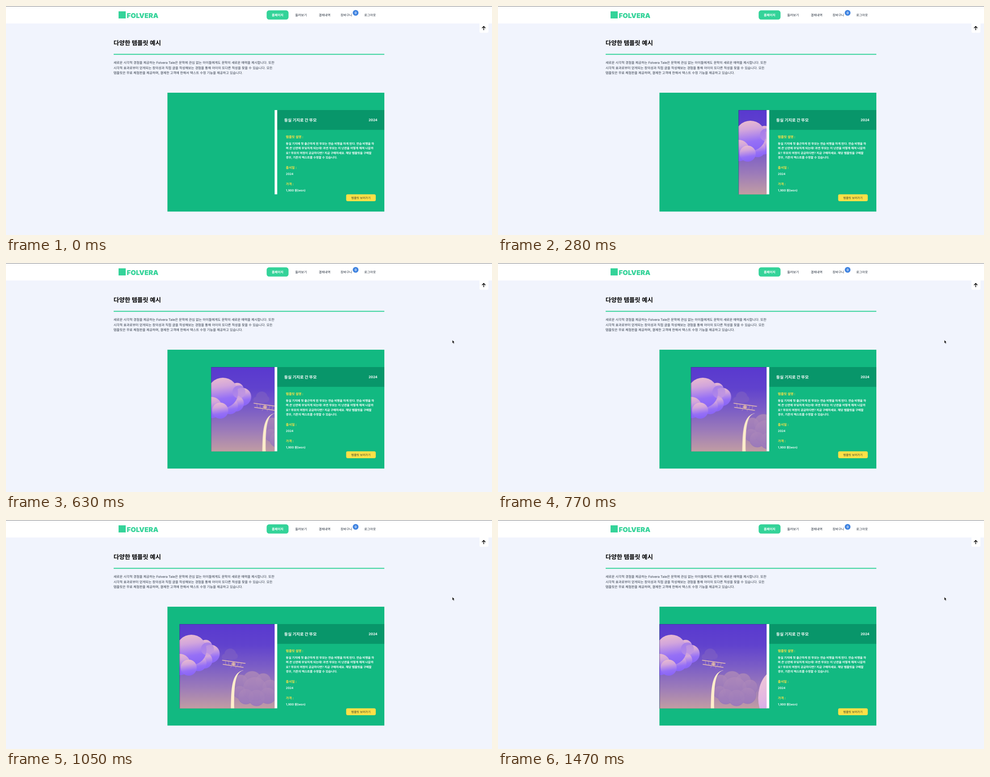
These frames come from a looping animation (1088 by 515 pixels, 2.17 s). An HTML page:

```html
<!DOCTYPE html>
<html lang="ko">
<head>
<meta charset="utf-8">
<title>템플릿 예시</title>
<style>
  html, body { margin: 0; width: 100%; height: 100%; overflow: hidden; background: #f1f4fd; }
  svg { display: block; width: 1088px; height: 515px; }
  text {
    font-family: Inter, "Noto Sans CJK KR", "Noto Sans CJK", "Noto Sans", sans-serif;
    text-rendering: geometricPrecision;
  }
  .nav { font-size: 7.05px; font-weight: 500; fill: #1f2937; text-anchor: middle; }
  .lead { font-size: 7.32px; fill: #2b3441; }
  .label { font-size: 7.2px; font-weight: 700; fill: #fde047; }
  .info { font-size: 6.58px; font-weight: 600; fill: #fff; }
</style>
</head>
<body>
<svg viewBox="0 0 1088 515">
  <defs>
    <linearGradient id="sky" x2="0" y2="1">
      <stop offset="0" stop-color="#5939cf"/>
      <stop offset=".25" stop-color="#6042cd"/>
      <stop offset=".5" stop-color="#7b5dc6"/>
      <stop offset=".75" stop-color="#9c7bb9"/>
      <stop offset="1" stop-color="#c29da3"/>
    </linearGradient>
    <linearGradient id="puff" x2=".15" y2="1">
      <stop offset="0" stop-color="#eebfcd"/>
      <stop offset=".35" stop-color="#d2a5dc"/>
      <stop offset=".75" stop-color="#9670f6"/>
      <stop offset="1" stop-color="#8b66f6"/>
    </linearGradient>
    <linearGradient id="fold" x2=".2" y2="1">
      <stop offset="0" stop-color="#8a66ef"/>
      <stop offset="1" stop-color="#c79be0"/>
    </linearGradient>
    <linearGradient id="haze" x2="0" y2="1">
      <stop offset="0" stop-color="#b38dba"/>
      <stop offset="1" stop-color="#9c7bbb"/>
    </linearGradient>
    <linearGradient id="rose" x2=".3" y2="1">
      <stop offset="0" stop-color="#f3cbd2"/>
      <stop offset=".5" stop-color="#e3b7e2"/>
      <stop offset="1" stop-color="#c79cf3"/>
    </linearGradient>
    <clipPath id="window"><rect x="361.5" y="234" width="240" height="190"/></clipPath>
  </defs>

  <!-- header -->
  <rect width="1088" height="515" fill="#f1f4fd"/>
  <rect width="1088" height="39.3" fill="#fff"/>
  <rect width="1088" height="1" fill="#77797d"/>
  <rect x="252" y="12" width="16" height="16" fill="#34d399"/>
  <text x="270.5" y="27.3" font-size="15" font-weight="900" fill="#34d399">FOLVERA</text>
  <rect x="583.5" y="9.8" width="49" height="20.8" rx="5.5" fill="#34d399"/>
  <g class="nav">
    <text x="608" y="22.7" style="fill:#fff;font-weight:700">홈페이지</text>
    <text x="660.5" y="22.7">둘러보기</text>
    <text x="713.2" y="22.7">결제내역</text>
    <text x="762" y="22.7">장바구니</text>
    <text x="815" y="22.7">로그아웃</text>
  </g>
  <circle cx="782.7" cy="15.4" r="6.4" fill="#3f83e0"/>
  <text x="782.7" y="18" font-size="7" font-weight="600" fill="#fff" text-anchor="middle">0</text>
  <path d="M1060 39.3h20v18a3 3 0 0 1-3 3h-14a3 3 0 0 1-3-3z" fill="#fff"/>
  <path d="M1069.5 54.3v-8.4m-3.8 3.9 3.8-4 3.8 4" fill="none" stroke="#000" stroke-width="1.5"/>

  <!-- intro -->
  <text x="240.8" y="88.4" font-size="13.55" font-weight="700">다양한 템플릿 예시</text>
  <rect x="241" y="107.6" width="606" height="2.1" fill="#34d399"/>
  <g class="lead">
    <text x="240.8" y="129.9">새로운 시각적 경험을 제공하는 Folvera Tale은 문학에 관심 없는 아이들에게도 문학의 새로운 매력을 제시합니다. 또한</text>
    <text x="240.8" y="141.5">시각적 효과로부터 얻게되는 창의성과 직접 글을 작성해보는 경험을 통해 아이의 또다른 적성을 찾을 수 있습니다. 모든</text>
    <text x="240.8" y="153">템플릿은 무료 체험판을 제공하며, 결제한 고객에 한해서 텍스트 수정 기능을 제공하고 있습니다.</text>
  </g>

  <!-- card -->
  <rect x="361.4" y="195" width="485.6" height="267.3" fill="#12b981"/>
  <rect x="607" y="234" width="240" height="44.5" fill="#08966a"/>
  <text x="622.7" y="259.7" font-size="9.02" font-weight="700" fill="#fff">둥실 기지로 간 뚜모</text>
  <text x="831.5" y="259.2" font-size="7.6" font-weight="700" fill="#fff" text-anchor="end">2024</text>
  <g class="label">
    <text x="626.6" y="297.2">템플릿 설명 :</text>
    <text x="626.6" y="366.1">출시일 :</text>
    <text x="626.6" y="403">가격 :</text>
  </g>
  <g class="info">
    <text x="626.6" y="311.7">둥실 기지에 첫 출근하게 된 뚜모는 연습 비행을 하게 된다. 연습 비행을 하</text>
    <text x="626.6" y="322.1">며 큰 난관에 부딪히게 되는데! 과연 뚜모는 이 난관을 어떻게 해쳐 나갈까</text>
    <text x="626.6" y="332.5">요? 뚜모의 여정이 궁금하다면? 지금 구매하세요. 해당 템플릿을 구매할</text>
    <text x="626.6" y="342.9">경우, 기존의 텍스트를 수정할 수 있습니다.</text>
    <text x="626.6" y="380.3">2024</text>
    <text x="626.6" y="417.3">1,900 원(won)</text>
  </g>
  <rect x="761.5" y="423.4" width="66.3" height="15.7" rx="3.5" fill="#fde047"/>
  <text x="794.6" y="433.7" font-size="6.45" font-weight="500" fill="#33402c" text-anchor="middle">템플릿 보러가기</text>

  <!-- the picture slides out from behind the white bar -->
  <g clip-path="url(#window)">
    <g id="slide">
      <g clip-path="url(#window)">
        <rect x="361.5" y="234" width="240" height="190" fill="url(#sky)"/>
        <g id="far" fill="#8263c2" opacity=".55"></g>
        <g id="near"></g>
        <g id="low"></g>
        <path d="M476.5 424C477.5 385 476 341 507 337.6C491 341 483 352 484 424Z" fill="#ffedcb"/>
        <ellipse cx="622" cy="400" rx="39.5" ry="62" fill="url(#rose)"/>
        <g fill="none" stroke="#dfb8b1" stroke-linecap="round">
          <path d="M457.5 315.3 508.5 322.4M459 324.6 504 331.3" stroke-width="1.7"/>
          <path d="M464 316.5l1 8.5m6-7.5 1 8.5m21-5.5-2 8.5m9-7.5-2 8.5M478 328l-2 4m11-2 1 3" stroke-width=".6"/>
        </g>
        <circle cx="482.3" cy="324" r="4.6" fill="#cfa6ae"/>
        <path d="M478 320l8.5 8.5m-.5-9-7.5 9" stroke="#8e6b9f" stroke-width=".8"/>
        <circle cx="482.3" cy="324.3" r="1.8" fill="#e7c6b6"/>
        <path d="M361.8 424V234.3H601.5" fill="none" stroke="#2c2a78" stroke-width=".8" opacity=".75"/>
        <path d="M361.5 423.8H601.5" stroke="#7d8a79" stroke-width=".6"/>
      </g>
    </g>
  </g>
  <rect x="601.4" y="234" width="5.8" height="189.5" fill="#fff"/>

  <path id="pointer" d="M999.3 173.3v7.2l1.6-1.5 1.2 2.7 1.2-.5-1.2-2.7h2.1z" fill="#000" stroke="#fff" stroke-width=".4"/>
</svg>
<script>
const LOOP = 2170, STEP = 70;
const $ = id => document.getElementById(id);

// Puffs are [x, y, radius].
function puffs(id, list, attrs = {}) {
  for (const [cx, cy, r] of list) {
    const c = document.createElementNS('http://www.w3.org/2000/svg', 'circle');
    for (const [k, v] of Object.entries({ cx, cy, r, ...attrs })) c.setAttribute(k, v);
    $(id).append(c);
  }
}

puffs('far', [[475, 302, 13], [463, 308, 7], [485, 306, 7]]);

puffs('near', [[420, 284, 14.5], [431, 301, 20.5], [417, 316, 18], [404, 322, 18],
  [358, 298, 28], [388, 292, 34], [362, 325, 24], [382, 332, 18]], { fill: 'url(#puff)' });
puffs('near', [[424, 290, 14.5]], { fill: 'url(#fold)', opacity: .6 });

const low = [[524, 361, 21], [549, 362, 17], [564, 376, 17], [499, 364, 16], [496, 387, 14],
  [510, 397, 17], [534, 400, 18], [559, 395, 18], [530, 380, 27]];
puffs('low', low, { fill: '#9b79b9', stroke: '#9273b8', 'stroke-width': 1 });
puffs('low', low, { fill: 'url(#haze)', opacity: .5 });

// Visible picture width after each step.
const shown = [0, 11, 28, 45.5, 63, 80, 96.5, 113, 128.5, 142.5, 156, 169.5, 182,
  193.5, 203.5, 213, 221, 228, 233, 236.5, 239, 240];

function play(el, frames) {
  const last = frames[frames.length - 1];
  const keys = frames.map(([t, props]) => ({ ...props, offset: t / LOOP, easing: 'step-end' }));
  el.animate([...keys, { ...last[1], offset: 1 }], { duration: LOOP, iterations: Infinity });
}

play($('slide'), shown.map((w, i) => [i * STEP, { transform: `translateX(${240 - w}px)` }]));
play($('pointer'), [[0, { opacity: 0 }], [490, { opacity: 1 }]]);
</script>
</body>
</html>
```
